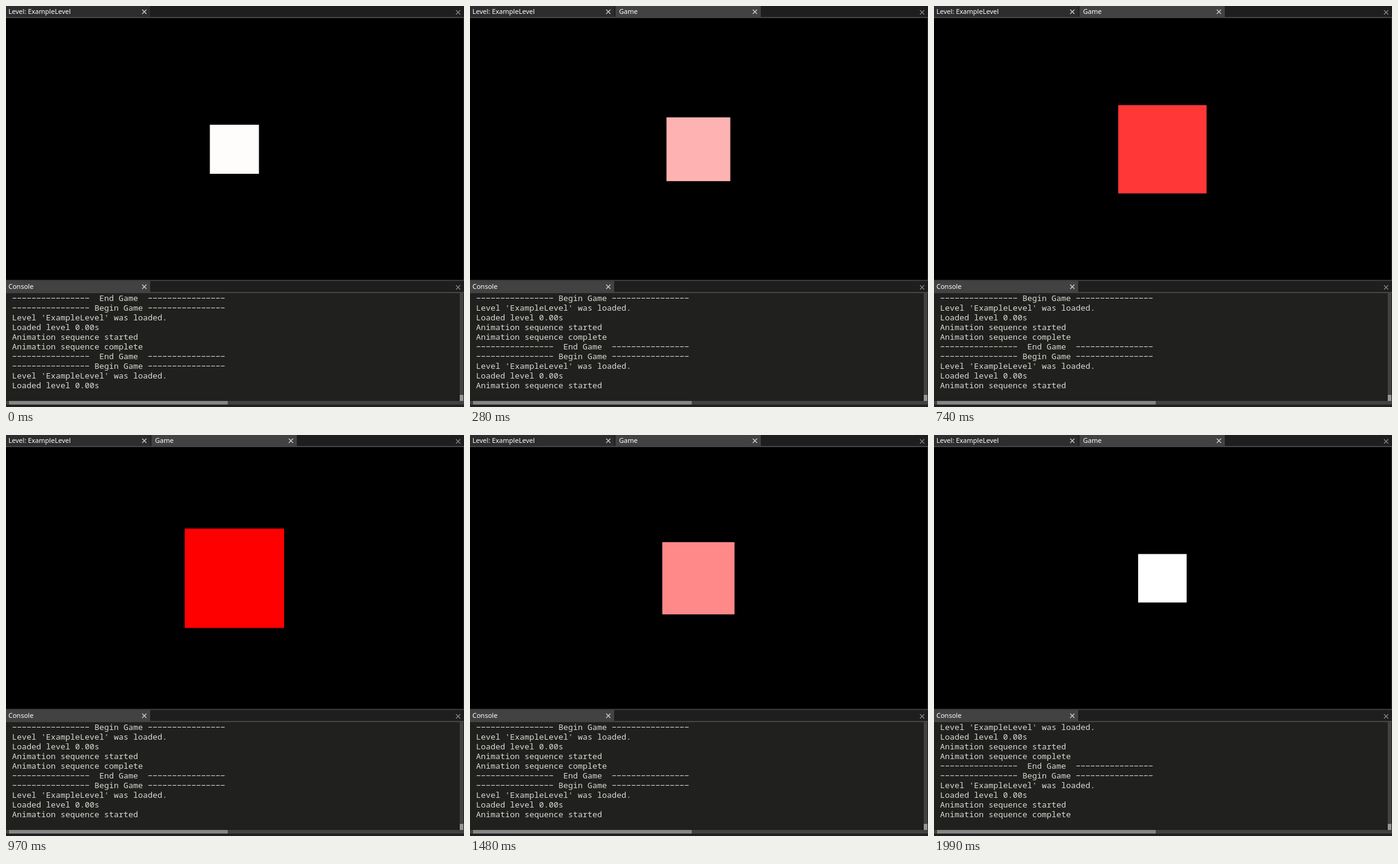
An HTML page that plays this animation: 756 by 662 pixels, repeating every 2130 ms.

```html
<!DOCTYPE html>
<html lang="en">
<head>
<meta charset="utf-8">
<title>Level editor</title>
<style>
  html, body { margin: 0; width: 100%; height: 100%; overflow: hidden; background: #000; }
  svg { display: block; }
  text { white-space: pre; }
  .ui { font: 11px "Noto Sans", "Open Sans", sans-serif; fill: #fff; }
  .log { font: 13.333px "Noto Sans Mono", "DejaVu Sans Mono", monospace; fill: #d9d9d4; }
  .cross { fill: none; stroke: #d6d6d6; stroke-width: 1.1; }
  .dim { stroke: #8c8c8c; }
</style>
</head>
<body>
<svg id="stage" width="756" height="662" viewBox="0 0 756 662"></svg>
<script>
const NS = "http://www.w3.org/2000/svg";
const stage = document.getElementById("stage");

function add(tag, attrs, parent = stage) {
  const node = document.createElementNS(NS, tag);
  for (const key in attrs) node.setAttribute(key, attrs[key]);
  return parent.appendChild(node);
}

const box = (x, y, width, height, fill, parent) =>
  add("rect", { x, y, width, height, fill }, parent);

function label(x, y, string, style, parent) {
  const node = add("text", { x, y, class: style }, parent);
  node.textContent = string;
  return node;
}

const cross = (x, y, style = "cross", parent) =>
  add("path", { d: `M${x - 3.5} ${y - 3.5}l7 7m0 -7l-7 7`, class: style }, parent);

function tab(x, y, width, name, fill, textX) {
  const group = add("g", {});
  box(x, y, width, 18, fill, group);
  label(textX, y + 13, name, "ui", group);
  cross(x + width - 9.7, y + 9.5, "cross", group);
  return group;
}

function tabBar(y) {
  box(0, y, 756, 18, "#1e1e1e");
  box(0, y + 18, 756, 2, "#444");
  cross(746.3, y + 10.5, "cross dim");
}

// Viewport
box(0, 0, 756, 662, "#000");
tabBar(0);
tab(0, 0, 238, "Level: ExampleLevel", "#2d2d2d", 4);
const gameTab = tab(240, 0, 240, "Game", "#424242", 246);
box(755, 20, 1, 432, "#303030");
const square = box(0, 0, 0, 0, "#fff");

// Console
box(0, 452, 756, 2, "#3a3a3a");
tabBar(454);
tab(0, 454, 238, "Console", "#424242", 4);
box(0, 474, 756, 188, "#20201e");
box(749, 474, 6, 178, "#424242");
box(749, 642, 6, 10, "#969696");
box(0, 652, 756, 6, "#424242");
box(5, 652, 361, 6, "#858585");
box(0, 658, 756, 4, "#222022");

const dashes = "\u2212".repeat(16);
const messages = [
  `${dashes}  End Game  ${dashes}`,
  `${dashes} Begin Game ${dashes}`,
  "Level 'ExampleLevel' was loaded.",
  "Loaded level 0.00s",
  "Animation sequence started",
  "Animation sequence complete"
];
const rows = Array.from({ length: 10 }, (_, i) => label(10, 487 + 16 * i, "", "log"));

// Timing: 50 ms ticks, with two shorter ones in every eleven
const LOOP = 2130;
const LAST = 43;
const tickLength = i => (i % 11 === 0 || i % 11 === 6 ? 30 : 50);

function tickAt(time) {
  let tick = 0;
  let end = tickLength(0);
  while (tick < LAST && time >= end) end += tickLength(++tick);
  return tick;
}

// Tween progress as [tick, amount]
const path = [[0, 0.012], [16, 0.784], [20.5, 1], [21, 1], [24, 0.863],
              [26, 0.741], [37, 0.239], [42.24, 0], [LAST, 0]];

function progress(tick) {
  const next = Math.max(1, path.findIndex(([at]) => at >= tick));
  const [t0, p0] = path[next - 1];
  const [t1, p1] = path[next];
  return p0 + (p1 - p0) * (tick - t0) / (t1 - t0);
}

let shownTick = -1;

function render(time) {
  const tick = tickAt(time);
  if (tick === shownTick) return;
  shownTick = tick;

  const amount = progress(tick);
  const size = 80 + 84 * amount;
  const tint = Math.round(255 * (1 - amount));
  square.setAttribute("x", 377 - size / 2);
  square.setAttribute("y", 236.5 - size / 2);
  square.setAttribute("width", size);
  square.setAttribute("height", size);
  square.setAttribute("fill", `rgb(255,${tint},${tint})`);

  gameTab.setAttribute("visibility", tick > 0 ? "visible" : "hidden");
  const scroll = tick === 0 ? 0 : tick < LAST ? 1 : 2;
  rows.forEach((row, i) => { row.textContent = messages[(i + scroll) % messages.length]; });
}

const start = performance.now();
function loop() {
  render((performance.now() - start) % LOOP);
  requestAnimationFrame(loop);
}
loop();
</script>
</body>
</html>
```
